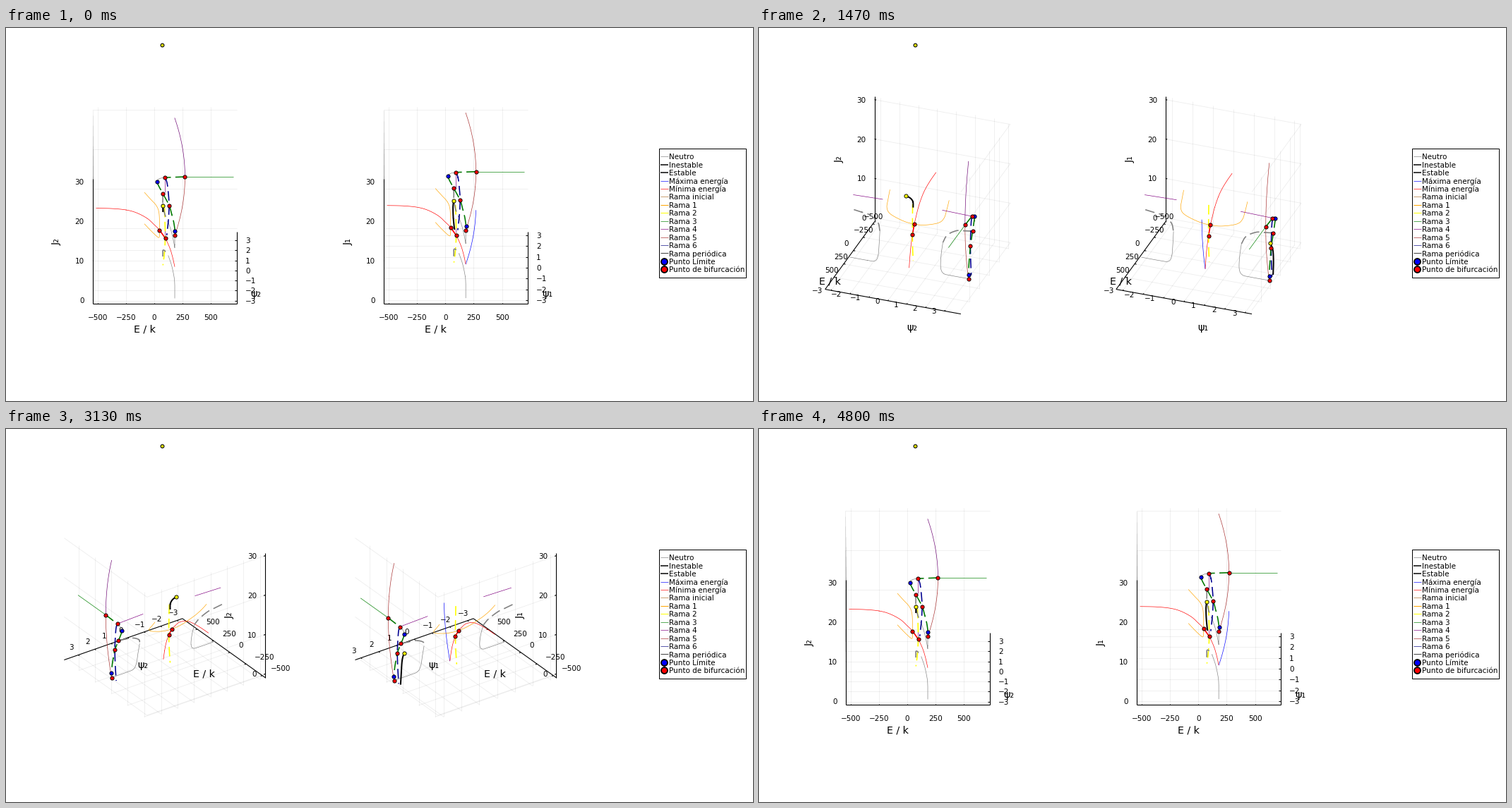
Animation, 1058 px wide and 529 px high, one loop 4870 ms. Source, as a matplotlib script:

```python
import numpy as np
import matplotlib.pyplot as plt
from matplotlib.animation import FuncAnimation
from matplotlib.collections import LineCollection
from matplotlib.patches import Rectangle

W, H, DPI = 1058, 529, 64
LOOP_MS = 4870
TICKS_PER_LOOP = 219              # finer than the turn steps, to keep them on time
TICK_MS = LOOP_MS / TICKS_PER_LOOP
STEP_MS, STEP_DEG, LAST_STEP = 200 / 3, 5, 72
SIDE = 204.5                      # edge of the plot cube in pixels
SIN_EL, COS_EL = 0.5, np.sqrt(3) / 2
PI = np.pi
E_LIM, J_LIM = (-544.6, 727.2), (-0.93, 30.75)
TICKS = (range(-500, 501, 250), range(-3, 4), range(0, 31, 10))

plt.rcParams["font.family"] = "DejaVu Sans"


def px(v):
    return v * 72 / DPI


fig = plt.figure(figsize=(W / DPI, H / DPI), dpi=DPI, facecolor="white")
ax = fig.add_axes([0, 0, 1, 1])
ax.set(xlim=(0, W), ylim=(H, 0))
ax.axis("off")


def smooth(points, n=12):
    """Catmull-Rom curve through the points."""
    p = np.array(points, float)
    if len(p) < 3:
        return p
    p = np.vstack([2 * p[0] - p[1], p, 2 * p[-1] - p[-2]])
    t = np.linspace(0, 1, n)[:, None]
    parts = []
    for a, b, c, d in zip(p, p[1:], p[2:], p[3:]):
        parts.append(b + 0.5 * t * (c - a + t * (2 * a - 5 * b + 4 * c - d
                                                 + t * (3 * (b - c) + d - a))))
    return np.vstack(parts)


def plane(psi, *points):
    """Points (E, J) at a constant angle."""
    return [(e, psi, j) for e, j in points]


def mirrored(points):
    return [(e, -psi, j) for e, psi, j in points]


# Bifurcation points (E, J)
LOW_A, LOW_B = (46.2, 9.32), (96, 7.26)
TOP_C, TOP_D = (92.9, 14.65), (270, 14.83)
MID_E, MID_F, END_G = (74.2, 10.62), (130.2, 7.59), (180, -0.05)
LIMIT_1, LIMIT_2 = (24.4, 13.66), (183, 1.05)


def fold(j0, j1):
    """Parabolic branch with its turning point at TOP_D."""
    return [(270 - 90 * ((j - 14.83) / 14.88) ** 2, j) for j in np.linspace(j0, j1, 20)]


RED_LINE = plane(0, (-513.6, 14.87), (-373.6, 14.78), (-249, 14.43), (-156, 13.7),
                 (-62.6, 12.28), (-0.4, 10.67), LOW_A, LOW_B,
                 (136.4, 4.77), (161, 2.44), (180, 0))
HALF_U = [(-87.5, 1.566, 14.9), (-33, 1.552, 13.2), (16.7, 1.51, 11.72),
          (40.3, 1.264, 10.64), (45.9, 0.56, 9.56)]
ORANGE_LINE = HALF_U + [(46.2, 0, 9.32)] + mirrored(HALF_U)[::-1]
YELLOW_LINE = plane(0, (89.8, 15), (94, 11), LOW_B, (89, 3.5), (75.8, 0.4))
NAVY_LINE = plane(PI, TOP_C, (111, 13.4), (122.4, 11), MID_F, (123.6, 3.75), (109.3, 0))
GREEN_DASH = plane(PI, LIMIT_1, (35.3, 12.7), MID_E, MID_F, (153.5, 5.3),
                   (171, 3.3), LIMIT_2)
GREEN_TURN = plane(PI, TOP_C, (54, 14.45), (32, 14.1), LIMIT_1)
LOOP_DASH = [(74.2, PI, 10.62), (75, 2.72, 10.35), (75.8, 2.3, 10.04),
             (91, 1.84, 8.77), (122.4, 1.667, 7.15)]
LOOP_THIN = [(122.4, 1.667, 7.15), (153.5, 1.64, 4.4), (175, 1.66, 1.47),
             (179.6, 1.82, 0.17), (180, 2.2, 0), (180, PI, 0)]
ORBIT_2 = [(77.3, -0.39, 16.5), (77, -0.274, 16.42), (76.4, -0.116, 16.06),
           (75.7, -0.01, 15.3), (75.7, 0, 13.9)]
ORBIT_1 = [(73.3, 2.98, 7.88), (70, 3.07, 6.85), (67.7, 3.12, 5.6),
           (70.8, PI, 3), (80.7, PI, 0.1)]

THIN, THICK = 0.65, 1.6
GRAY, DARK_GREEN, BROWN = "#808080", "#007800", "#a52a2a"


class Panel:
    def __init__(self, cx, psi_lim, index, orbit, top_color, extra):
        self.center = np.array([cx, 251.5])
        lims = np.array([E_LIM, psi_lim, J_LIM])
        self.lo, self.span = lims[:, 0], lims[:, 1] - lims[:, 0]
        self.make_frame()
        self.tick_texts = [[self.text(f"{v}".replace("-", "\u2212"), 10.4) for v in vals]
                           for vals in TICKS]
        self.guides = [self.text("E / k", 14.3), self.text("ψ" + index, 14.3),
                       self.text("J" + index, 14.3)]
        self.guides[2].set(rotation=90, va="center")
        self.curves = []
        curve = self.curve
        curve(LOOP_THIN, GRAY)
        curve(mirrored(LOOP_THIN), GRAY)
        for pts in extra:
            curve(pts, "blue")
        curve(RED_LINE, "red")
        curve(ORANGE_LINE, "orange")
        curve(plane(PI, TOP_D, (695.5, 14.83)), "green")
        curve(GREEN_TURN, GRAY)
        curve(plane(PI, LIMIT_2, (184, 0.5), END_G), GRAY)
        for sign in (1, -1):
            e, j = TOP_C
            curve([(e, sign * PI, j), (e, sign * PI / 2, 14.85)], "purple")
        curve(plane(PI, *fold(END_G[1], 14.83)), BROWN)
        curve(plane(PI, *fold(14.83, 29.8)), top_color)
        curve(plane(0, LOW_A, LOW_B), "red", THICK)
        curve(YELLOW_LINE, "yellow", THICK, True)
        curve(LOOP_DASH, GRAY, THICK, True)
        curve(mirrored(LOOP_DASH), GRAY, THICK, True)
        curve(NAVY_LINE, "#000090", THICK, True)
        curve(plane(PI, TOP_D, TOP_C), DARK_GREEN, THICK, True)
        curve(GREEN_DASH, DARK_GREEN, THICK, True)
        curve(orbit, "black", 2)
        self.dots(plane(PI, LIMIT_1, LIMIT_2), "blue")
        self.dots(plane(0, LOW_A, LOW_B)
                  + plane(PI, TOP_C, TOP_D, MID_E, MID_F, END_G), "red")
        self.dots(orbit[:1], "yellow")

    def norm(self, points):
        return (np.asarray(points, float) - self.lo) / self.span - 0.5

    def text(self, s, size):
        return ax.text(0, 0, s, fontsize=px(size), ha="center", va="center_baseline", zorder=3)

    def curve(self, points, color, width=THIN, dashed=False):
        style = (0, (8.5, 4)) if dashed else "-"
        line, = ax.plot([], [], color=color, lw=px(width), ls=style, zorder=4,
                        dash_capstyle="butt", solid_capstyle="butt")
        self.curves.append((line, self.norm(smooth(points))))

    def dots(self, points, color):
        line, = ax.plot([], [], "o", color=color, ms=px(5.2), mec="black",
                        mew=px(0.9), zorder=5)
        self.curves.append((line, self.norm(points)))

    def make_frame(self):
        l, h, tick = -0.5, 0.5, 0.013
        xs, ys, zs = [(np.array(v) - self.lo[i]) / self.span[i] - 0.5
                      for i, v in enumerate(TICKS)]
        grid = []
        for x in xs:
            grid += [[(x, l, l), (x, h, l)], [(x, h, l), (x, h, h)]]
        for y in ys:
            grid += [[(l, y, l), (h, y, l)], [(l, y, l), (l, y, h)]]
        for z in zs:
            grid += [[(l, l, z), (l, h, z)], [(l, h, z), (h, h, z)]]
        self.tick_points = [np.array([(x, l, l) for x in xs]),
                            np.array([(h, y, l) for y in ys]),
                            np.array([(l, l, z) for z in zs])]
        axes = [[(l, l, l), (h, l, l)], [(h, l, l), (h, h, l)], [(l, l, l), (l, l, h)]]
        self.mids = np.array(axes).mean(axis=1)
        inward = [(0, tick, 0), (-tick, 0, 0), (0, tick, 0)]
        for pts, d in zip(self.tick_points, inward):
            axes += [[tuple(p), tuple(p + d)] for p in pts]
        self.frame = []
        for segs, style in ((grid, dict(alpha=0.065, lw=px(0.9), zorder=1)),
                            (axes, dict(lw=px(1.1), zorder=2))):
            lines = LineCollection([], colors="black", **style)
            ax.add_collection(lines, autolim=False)
            self.frame.append((lines, np.array(segs)))

    def project(self, p, deg):
        a = np.radians(deg)
        c, s = np.cos(a), np.sin(a)
        x, y, z = p[..., 0], p[..., 1], p[..., 2]
        flat = np.stack([x * c + y * s, SIN_EL * (x * s - y * c) - COS_EL * z], axis=-1)
        return self.center + SIDE * flat

    def update(self, deg):
        for lines, segs in self.frame:
            lines.set_segments(list(self.project(segs, deg)))
        for line, pts in self.curves:
            line.set_data(*self.project(pts, deg).T)
        places = (label_place(deg), label_place(deg - 90), ("right", -12, 0))
        for texts, pts, (align, dx, dy) in zip(self.tick_texts, self.tick_points, places):
            for t, (x, y) in zip(texts, self.project(pts, deg)):
                t.set_position((x + dx, y + dy))
                t.set_ha(align)
        shifts = ((-28, 35), (27.3, 35), (-50.3, 0))
        for t, pos, shift in zip(self.guides, self.project(self.mids, deg), shifts):
            t.set_position(pos + shift)


def label_place(phase):
    """Alignment and offset of tick labels for an axis turned by phase degrees."""
    phase %= 360
    up = -10.5 - 2.6 * abs(np.cos(np.radians(phase))) ** 8
    if phase == 0:
        return "center", 0, 19
    if phase <= 90:
        return "right", -12, 0
    if phase < 180:
        return "left", -13.5, up
    if phase == 180:
        return "center", 0, up
    if phase < 270:
        return "left", 12, up
    return "left", 12, 0


def draw_legend():
    entries = [("Neutro", GRAY, THIN), ("Inestable", "black", 1.5), ("Estable", "black", 1.5),
               ("Máxima energía", "blue", THIN), ("Mínima energía", "red", THIN),
               ("Rama inicial", "#b0702c", THIN), ("Rama 1", "orange", 1),
               ("Rama 2", "yellow", 1), ("Rama 3", "green", THIN),
               ("Rama 4", "purple", THIN), ("Rama 5", BROWN, THIN),
               ("Rama 6", "#000080", THIN), ("Rama periódica", "#404040", 1),
               ("Punto Límite", "blue", 0), ("Punto de bifurcación", "red", 0)]
    ax.add_patch(Rectangle((924.5, 170.5), 123.5, 183, fc="white", ec="black", lw=px(1)))
    for i, (name, color, width) in enumerate(entries):
        y = 182.3 + 11.43 * i
        if width:
            ax.plot([926.5, 938], [y, y], color=color, lw=px(width), solid_capstyle="butt")
        else:
            ax.plot([932.3], [y], "o", color=color, ms=px(9), mec="black", mew=px(1.8))
        ax.text(939.2, y, name, fontsize=px(10.4), va="center_baseline")


panels = [
    Panel(224.75, (-3.32, 3.86), "₂", ORBIT_2, "#6a0070", []),
    Panel(636.9, (-3.33, 3.33), "₁", ORBIT_1, BROWN, [plane(0, *fold(-0.05, 13.7))]),
]
draw_legend()
ax.plot([220.8], [24], "o", color="yellow", ms=px(4.8), mec="black", mew=px(1.1))


def update(i):
    # A turn step shows from the tick in which it begins.
    step = min(int((i + 1) * TICK_MS / STEP_MS), LAST_STEP)
    for panel in panels:
        panel.update(step * STEP_DEG)
    return []


anim = FuncAnimation(fig, update, frames=TICKS_PER_LOOP, interval=TICK_MS,
                     repeat=True, repeat_delay=0, blit=False)
plt.show()
```
